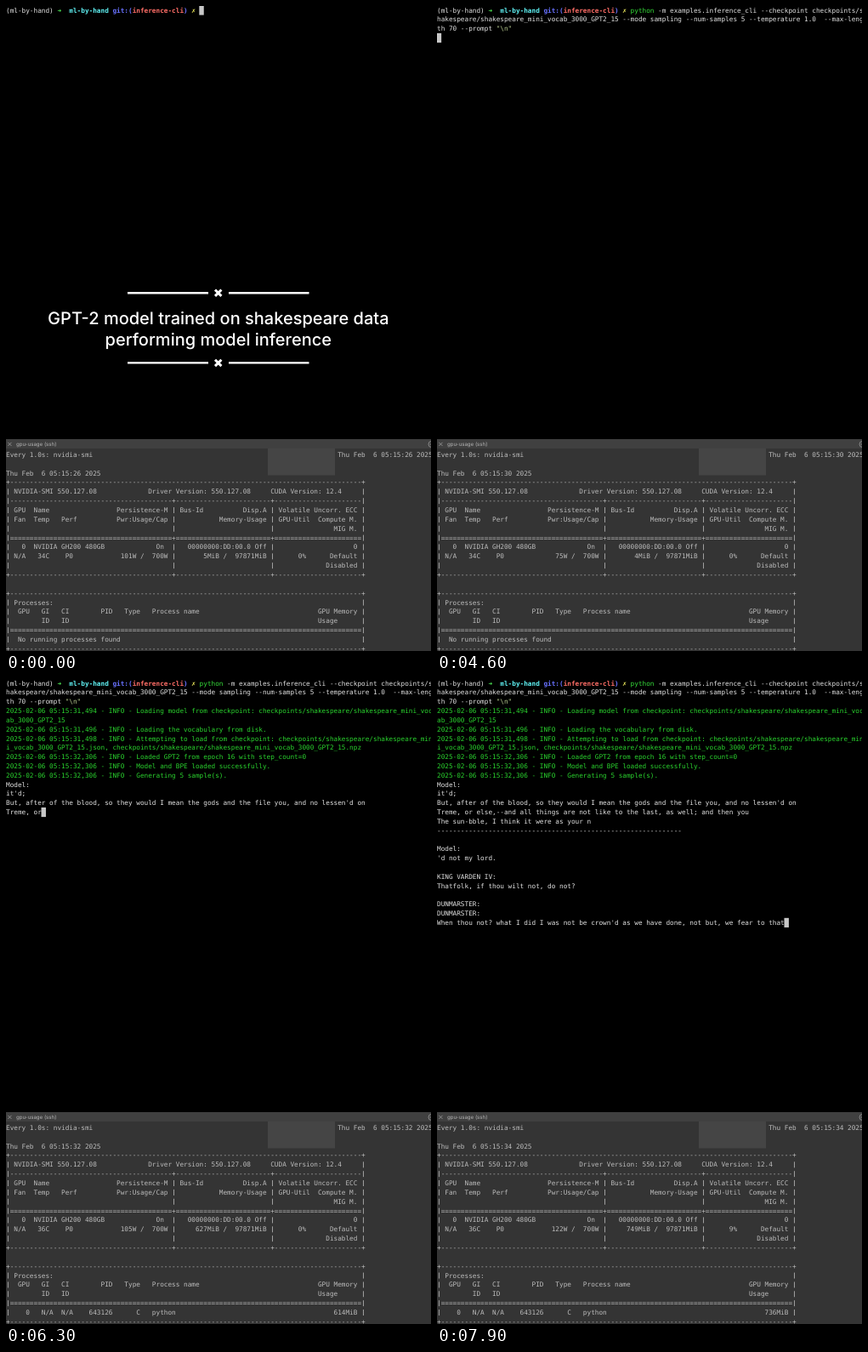
Recreate the animation shown at these times as an HTML page with a canvas. Size 500 by 758 pixels, loop 8 s.

```html
<!DOCTYPE html>
<html lang="en">
<head>
<meta charset="utf-8">
<title>Model inference in a terminal</title>
<style>
html, body { margin: 0; width: 100%; height: 100%; overflow: hidden; background: #000; }
canvas { display: block; }
</style>
</head>
<body>
<canvas id="stage" width="500" height="758"></canvas>
<script>
const ctx = document.getElementById('stage').getContext('2d');
const LOOP = 8000, STEP = 100;
const CELL = 4.645, COLS = 108;
const MONO = '"DejaVu Sans Mono", monospace';
const SANS = 'Inter, sans-serif';
const GREY = '#e2e2e2', GREEN = '#2ad42e', TYPED = '#35dc39';

// ---------- text grid ----------
function drawChar(ch, col, baseline, color, bold) {
  ctx.fillStyle = color;
  if (ch === '|') {
    ctx.fillRect((col + 0.5) * CELL - 0.4, baseline - 6, 0.8, 7);
    return;
  }
  ctx.font = (bold ? 'bold ' : '') + '7.72px ' + MONO;
  ctx.fillText(ch, col * CELL, baseline);
}

function drawLine(text, baseline, color) {
  [...text].forEach((ch, col) => { if (ch !== ' ') drawChar(ch, col, baseline, color); });
}

// ---------- upper terminal ----------
const ROW = 10.82;
const PROMPT = [
  ['(ml-by-hand) ', GREY],
  ['➜  ', '#4fee58', true],
  ['ml-by-hand ', '#60f4f6', true],
  ['git:(', '#6871ff', true],
  ['inference-cli', '#ff6e67', true],
  [') ', '#6871ff', true],
  ['✗ ', '#f6f25f', true]
];
const COMMAND = [
  ['python', TYPED],
  [' -m examples.inference_cli --checkpoint checkpoints/shakespeare/shakespeare_mini_vocab_3000_GPT2_15' +
   ' --mode sampling --num-samples 5 --temperature 1.0  --max-length 70 --prompt ', GREY],
  ['"\\n"', '#b8cc90']
];
const log = (time, msg) => `2025-02-06 05:15:${time} - INFO - ${msg}\n`;
const CKPT = 'checkpoints/shakespeare/shakespeare_mini_vocab_3000_GPT2_15';
const LOADING =
  log('31,494', 'Loading model from checkpoint: ' + CKPT) +
  log('31,496', 'Loading the vocabulary from disk.') +
  log('31,498', `Attempting to load from checkpoint: ${CKPT}.json, ${CKPT}.npz`);
const LOADED =
  log('32,306', 'Loaded GPT2 from epoch 16 with step_count=0') +
  log('32,306', 'Model and BPE loaded successfully.') +
  log('32,306', 'Generating 5 sample(s).');

const SAMPLE_1 = `it'd;
But, after of the blood, so they would I mean the gods and the file you, and no lessen'd on
Treme, or else,--and all things are not like to the last, as well; and then you
The sun-bble, I think it were as your n`;
const BREAK = '\n' + '-'.repeat(62) + '\n\nModel:\n';
const SAMPLE_2 = `'d not my lord.

KING VARDEN IV:
Thatfolk, if thou wilt not, do not?

DUNMARSTER:
DUNMARSTER:
When thou not? what I did I was not be crown'd as we have done, not but, we fear to that`;
const MIDWAY = SAMPLE_1.indexOf(' your n');
const TOTAL = SAMPLE_1.length + SAMPLE_2.length;

// Step back to the end of a whole word.
function wholeWords(text, n) {
  while (n > 0 && !/\s/.test(text[n] || ' ') && text[n - 1] !== '\n') n--;
  return text.slice(0, n);
}

function generated(t) {
  const n = Math.round(t < 6900
    ? MIDWAY * (t - 5600) / 1300
    : MIDWAY + (TOTAL - MIDWAY) * (t - 6900) / 1000);
  const rest = n - SAMPLE_1.length;
  if (rest < 0) return wholeWords(SAMPLE_1, n);
  return SAMPLE_1 + BREAK + wholeWords(SAMPLE_2, rest);
}

function terminalRuns(t) {
  const runs = [...PROMPT];
  if (t >= 1400) runs.push(...COMMAND);
  else if (t >= 800) runs.push(['pytho', TYPED]);
  if (t >= 2000) runs.push(['\n', GREY]);
  if (t >= 4900) runs.push([LOADING, GREEN]);
  if (t >= 5600) runs.push([LOADED, GREEN], ['Model:\n' + generated(t), GREY]);
  return runs;
}

function drawTerminal(t) {
  let col = 0, row = 0;
  for (const [text, color, bold] of terminalRuns(t)) {
    for (const ch of text) {
      if (ch === '\n') { col = 0; row++; continue; }
      if (col === COLS) { col = 0; row++; }
      if (ch !== ' ') drawChar(ch, col, row * ROW + 7.6, color, bold);
      col++;
    }
  }
  ctx.fillStyle = '#c8c8c8';
  ctx.fillRect(col * CELL - 0.3, row * ROW - 0.5, CELL + 0.8, ROW + 0.3);
}

// ---------- title card ----------
function drawOrnament(y) {
  ctx.lineWidth = 2.4;
  ctx.beginPath();
  ctx.moveTo(143, y); ctx.lineTo(238, y);
  ctx.moveTo(262, y); ctx.lineTo(356.5, y);
  ctx.stroke();
  ctx.lineWidth = 3;
  ctx.beginPath();
  ctx.moveTo(246, y - 3.7); ctx.lineTo(253.4, y + 3.7);
  ctx.moveTo(253.4, y - 3.7); ctx.lineTo(246, y + 3.7);
  ctx.stroke();
}

function drawTitle(t) {
  const alpha = Math.min(1, 1 - (t - 3600) / 400);
  if (alpha <= 0) return;
  ctx.save();
  ctx.globalAlpha = alpha;
  ctx.fillStyle = ctx.strokeStyle = '#fff';
  drawOrnament(337.2);
  drawOrnament(419.4);
  ctx.textAlign = 'center';
  ctx.font = '500 20px ' + SANS;
  ctx.fillText('GPT-2 model trained on shakespeare data', 249.8, 374);
  ctx.fillText('performing model inference', 249.8, 399);
  ctx.restore();
}

// ---------- GPU monitor ----------
// start, second, temperature, watts, memory, load, process memory
const READINGS = [
  [0, 26, 34, 101, 5, 0],
  [1000, 27, 34, 75, 4, 0],
  [2200, 28, 34, 75, 4, 0],
  [3300, 29, 34, 74, 4, 0],
  [4500, 30, 34, 75, 4, 0],
  [5600, 32, 36, 105, 627, 0, 614],
  [6800, 33, 36, 122, 743, 8, 730],
  [7900, 34, 36, 122, 749, 9, 736]
];

// Table row from [column, text] cells between vertical bars.
function tableRow(bars, ...cells) {
  const line = Array(91).fill(' ');
  for (const b of bars) line[b] = '|';
  for (const [col, text] of cells) [...text].forEach((ch, i) => { line[col + i] = ch; });
  return line.join('');
}
const EDGE = [0, 90], GRID = [0, 42, 67, 90];
const wide = (ch, end) => end + ch.repeat(89) + end;
const split = (ch, end) => end + [41, 24, 22].map(n => ch.repeat(n)).join('+') + end;

function monitorLines([, sec, temp, watts, mem, load, proc]) {
  const date = `Thu Feb  6 05:15:${sec} 2025`;
  const processRow = proc
    ? [[5, '0'], [9, 'N/A  N/A'], [21, '643126'], [33, 'C   python'], [83, proc + 'MiB']]
    : [[3, 'No running processes found']];
  return [
    'Every 1.0s: nvidia-smi'.padEnd(84) + date,
    '',
    date,
    wide('-', '+'),
    tableRow(EDGE, [2, 'NVIDIA-SMI 550.127.08'], [36, 'Driver Version: 550.127.08'], [67, 'CUDA Version: 12.4']),
    split('-', '|'),
    tableRow(GRID, [2, 'GPU  Name'], [28, 'Persistence-M'], [44, 'Bus-Id'], [60, 'Disp.A'], [69, 'Volatile Uncorr. ECC']),
    tableRow(GRID, [2, 'Fan  Temp   Perf'], [28, 'Pwr:Usage/Cap'], [54, 'Memory-Usage'], [69, 'GPU-Util  Compute M.']),
    tableRow(GRID, [83, 'MIG M.']),
    split('=', '|'),
    tableRow(GRID, [4, '0  NVIDIA GH200 480GB'], [38, 'On'], [46, '00000000:DD:00.0 Off'], [88, '0']),
    tableRow(GRID, [2, `N/A   ${temp}C    P0`], [29, `${watts}W`.padStart(4) + ' /  700W'],
      [47, `${mem}MiB`.padStart(7) + ' /  97871MiB'], [74, load + '%'], [82, 'Default']),
    tableRow(GRID, [81, 'Disabled']),
    split('-', '+'),
    '',
    wide('-', '+'),
    tableRow(EDGE, [2, 'Processes:']),
    tableRow(EDGE, [3, 'GPU   GI   CI        PID   Type   Process name'], [79, 'GPU Memory']),
    tableRow(EDGE, [9, 'ID   ID'], [79, 'Usage']),
    wide('=', '|'),
    tableRow(EDGE, ...processRow),
    wide('-', '+')
  ];
}

function drawMonitor(t) {
  ctx.fillStyle = '#343434';
  ctx.fillRect(0, 509, 500, 249);
  ctx.fillStyle = '#404040';
  ctx.fillRect(0, 509, 500, 11);
  ctx.fillStyle = '#454545';
  ctx.fillRect(308, 520, 79, 31.5);

  ctx.strokeStyle = '#9a9a9a';
  ctx.lineWidth = 0.8;
  ctx.beginPath();
  ctx.moveTo(2.3, 512.8); ctx.lineTo(6.5, 517);
  ctx.moveTo(6.5, 512.8); ctx.lineTo(2.3, 517);
  ctx.moveTo(504, 515); ctx.arc(500.5, 515, 3.5, 0, Math.PI * 2);
  ctx.moveTo(498.5, 515); ctx.lineTo(500, 515);
  ctx.stroke();
  ctx.font = '6.1px ' + SANS;
  ctx.fillStyle = '#b4b4b4';
  ctx.fillText('gpu-usage (ssh)', 12, 517.2);

  const reading = READINGS.filter(r => r[0] <= t).pop();
  monitorLines(reading).forEach((line, i) => drawLine(line, 529.9 + i * 10.855, '#bcbcbc'));
}

// ---------- loop ----------
let shown = -1;
function frame() {
  const t = Math.floor(performance.now() % LOOP / STEP) * STEP;
  if (t !== shown) {
    shown = t;
    ctx.textRendering = 'geometricPrecision';
    ctx.fillStyle = '#000';
    ctx.fillRect(0, 0, 500, 758);
    drawTerminal(t);
    drawTitle(t);
    drawMonitor(t);
  }
  requestAnimationFrame(frame);
}
frame();
</script>
</body>
</html>
```
